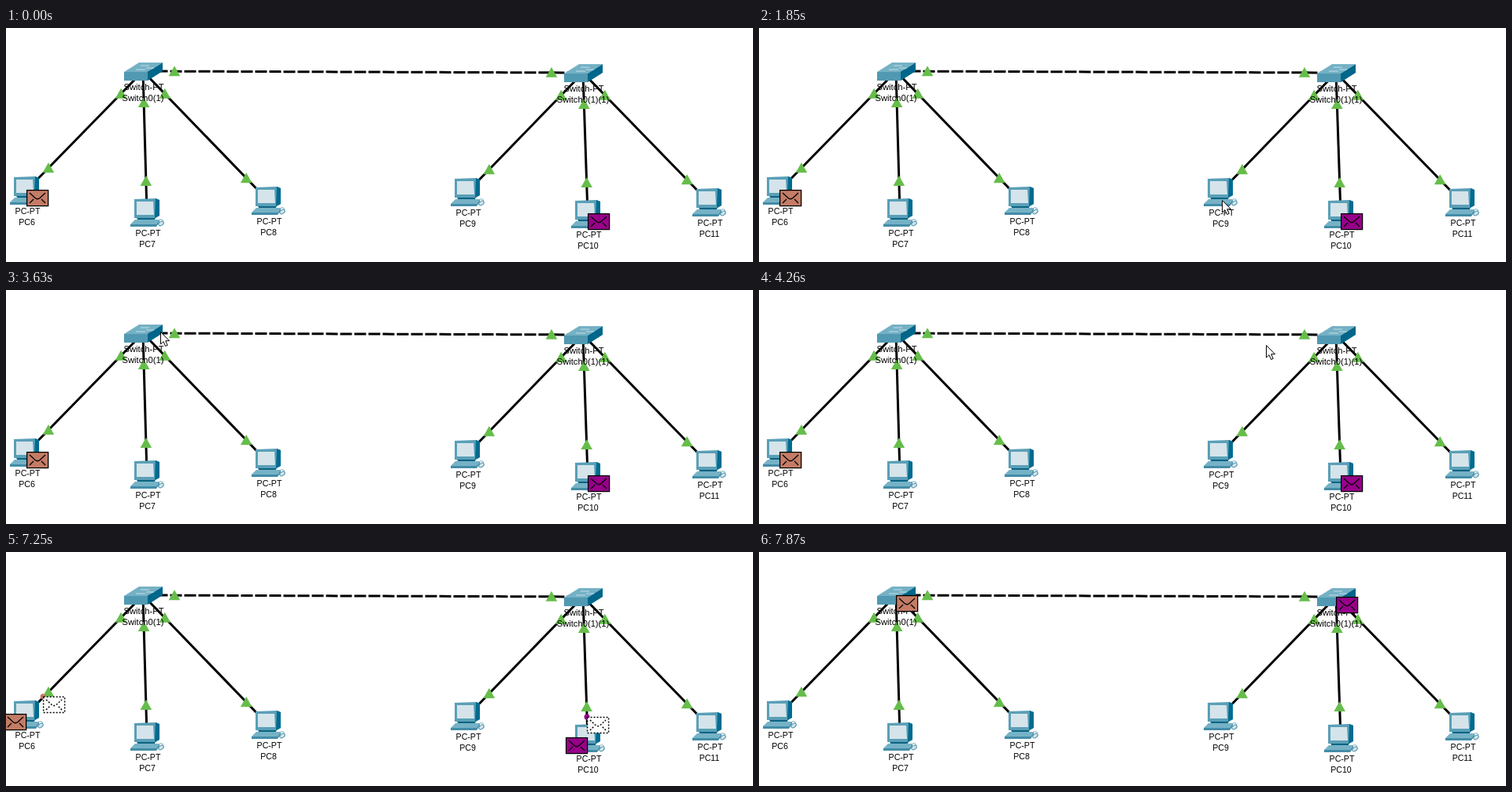
An HTML page that plays this animation: 949x298 px, repeating every 8 s.

```html
<!DOCTYPE html>
<html lang="en">
<head>
<meta charset="utf-8">
<title>Network simulation</title>
<style>
  html, body { margin: 0; width: 100%; height: 100%; overflow: hidden; background: #fff; }
  svg { display: block; width: 949px; height: 298px; }
  text { font-family: Arial, "Liberation Sans", sans-serif; text-anchor: middle; fill: #000; }
  .pc { font-size: 10.6px; }
  .switch { font-size: 11.2px; }
  .link { stroke: #000; stroke-width: 3; stroke-linecap: square; }
  .trunk { stroke-dasharray: 12 6; }
  .mail { stroke: #000; stroke-width: 1.3; }
  .mail path { fill: none; }
  .ghost { fill: #fff; stroke-width: 1.5; stroke-dasharray: 2 2; }
</style>
</head>
<body>
<svg viewBox="0 0 949 298">
  <defs>
    <!-- Device symbols have their link point at the origin -->
    <g id="pc">
      <path d="M-16-17 11-18 16-16V4L11 7H-16Z" fill="#5a9fb7"/>
      <path d="M11-18 16-16V4L10 7Z" fill="#006b90"/>
      <path d="M-13-14H8L9 3H-13Z" fill="#d5e4ea"/>
      <path d="M-13 7H11L9 10H-11Z" fill="#0b6482"/>
      <path d="M-15 9H16L12 15H-21Z" fill="#76b2c6"/>
      <path d="M-21 15H12L16 9V12L12 18H-21Z" fill="#438ca7"/>
      <path d="M16 9Q22 8 20 12" fill="none" stroke="#7aaec0"/>
      <ellipse cx="18" cy="14" rx="3.6" ry="2.3" transform="rotate(-35 18 14)" fill="#d5e4ea" stroke="#4b91ab"/>
    </g>
    <g id="switch">
      <path d="M-5-11H25L6 1H-24Z" fill="#74b1c5"/>
      <path d="M-24 1H6V12H-24Z" fill="#5199b2"/>
      <path d="M6 1 25-11V0L6 12Z" fill="#00668a"/>
      <path d="M-3-7H8M-9-2H3M4-4H14" stroke="#c4dee7"/>
    </g>
    <path id="up" d="M0-7 7.3 6H-7.3Z" fill="#66bd4a"/>
    <g id="mail">
      <rect x=".6" y=".6" width="27" height="20"/>
      <path d="M4 4 11 10.5Q14 13 17 10.5L24 4M4 17 9 12M24 17 19 12"/>
    </g>
  </defs>
  <g id="net"></g>
  <g id="packets"></g>
  <path id="cursor" d="M.5.5V16L4 12.7 6.6 18.5 9.2 17.4 6.7 11.7H11.5Z" fill="#fff" stroke="#000"/>
</svg>
<script>
const LOOP = 8000, SEND = 7250, ARRIVE = 7870, STEPS = 9, FIRST = 0.142, PORT = 40;
const $ = id => document.getElementById(id);
const mix = (a, b, k) => a + (b - a) * k;
const between = (a, b, k) => ({ x: mix(a.x, b.x, k), y: mix(a.y, b.y, k) });

// The right half of the network repeats the left one, shifted
const halves = [{ x: 174, y: 55, name: "Switch0(1)" }, { x: 733, y: 57, name: "Switch0(1)(1)" }];
const pcs = halves.flatMap((hub, h) =>
  [[26, 207], [179, 235], [333, 220]].map(([x, y], i) =>
    ({ x: x + 560 * h, y: y + 2 * h, name: "PC" + (6 + 3 * h + i), hub })));
const links = [halves, ...pcs.map(pc => [pc.hub, pc])];

const use = (id, { x, y }) => `<use href="#${id}" x="${x}" y="${y}"/>`;
const label = (cls, x, y, s) => `<text class="${cls}" x="${x}" y="${y}">${s}</text>`;
const line = ([a, b], i) =>
  `<line class="link ${i ? "" : "trunk"}" x1="${a.x}" y1="${a.y}" x2="${b.x}" y2="${b.y}"/>`;

// Port lights sit at a fixed distance from both ends of a link
function lights([a, b]) {
  const k = PORT / Math.hypot(b.x - a.x, b.y - a.y);
  return use("up", between(a, b, k)) + use("up", between(b, a, k));
}

$("net").innerHTML = [
  ...links.map(line),
  ...pcs.map(p => use("pc", p)),
  ...halves.map(s => use("switch", s)),
  ...links.map(lights),
  ...pcs.map(p => label("pc", p.x + 1.5, p.y + 30, "PC-PT") + label("pc", p.x + 0.5, p.y + 44, p.name)),
  ...halves.map(s => label("switch", s.x + 1, s.y + 24, "Switch-PT") + label("switch", s.x, s.y + 38, s.name))
].join("");

const packets = [{ pc: pcs[0], color: "#c47c66" }, { pc: pcs[4], color: "#98008a" }];

function drawPacket({ pc, color }, t) {
  const mail = (x, y) => `<g class="mail" fill="${color}">${use("mail", { x, y })}</g>`;
  if (t < SEND) return mail(pc.x, pc.y - 1);
  if (t >= ARRIVE) return mail(pc.hub.x, pc.hub.y);
  const step = Math.floor((t - SEND) / (ARRIVE - SEND) * STEPS);
  const at = between(pc, pc.hub, mix(FIRST, 1, step / STEPS));
  const x = Math.round(at.x), y = Math.round(at.y) - 1;
  return mail(pc.x - 28, pc.y - 1) +
    `<circle cx="${x}" cy="${y}" r="3.5" fill="${color}"/>` +
    `<g class="mail ghost">${use("mail", { x, y })}</g>`;
}

// Pointer visits as [time, x, y] key points; it is hidden after the last time
const visits = [
  { end: 2180, path: [[390, 813, 277], [940, 745, 179], [1150, 735, 73], [1290, 725, 55],
    [1850, 588, 219], [2000, 589, 220], [2110, 593, 271]] },
  { end: 5330, path: [[2380, 213, 280], [3080, 31, 191], [3630, 195, 53], [3990, 561, 75],
    [4530, 727, 66], [4730, 731, 66], [5200, 731, 66], [5260, 795, 91]] }
];

function pointer(t) {
  const v = visits.find(v => t >= v.path[0][0] && t < v.end);
  if (!v) return null;
  const i = v.path.findIndex(p => p[0] > t);
  if (i < 0) return v.path.at(-1).slice(1);
  const [a, b] = [v.path[i - 1], v.path[i]];
  const k = (t - a[0]) / (b[0] - a[0]);
  return [1, 2].map(n => Math.round(mix(a[n], b[n], k)));
}

let shown = "";
function frame() {
  const t = performance.now() % LOOP;
  const html = packets.map(p => drawPacket(p, t)).join("");
  if (html !== shown) $("packets").innerHTML = shown = html;
  const at = pointer(t), cursor = $("cursor");
  cursor.style.display = at ? "" : "none";
  if (at) cursor.setAttribute("transform", `translate(${at})`);
  requestAnimationFrame(frame);
}
frame();
</script>
</body>
</html>
```
